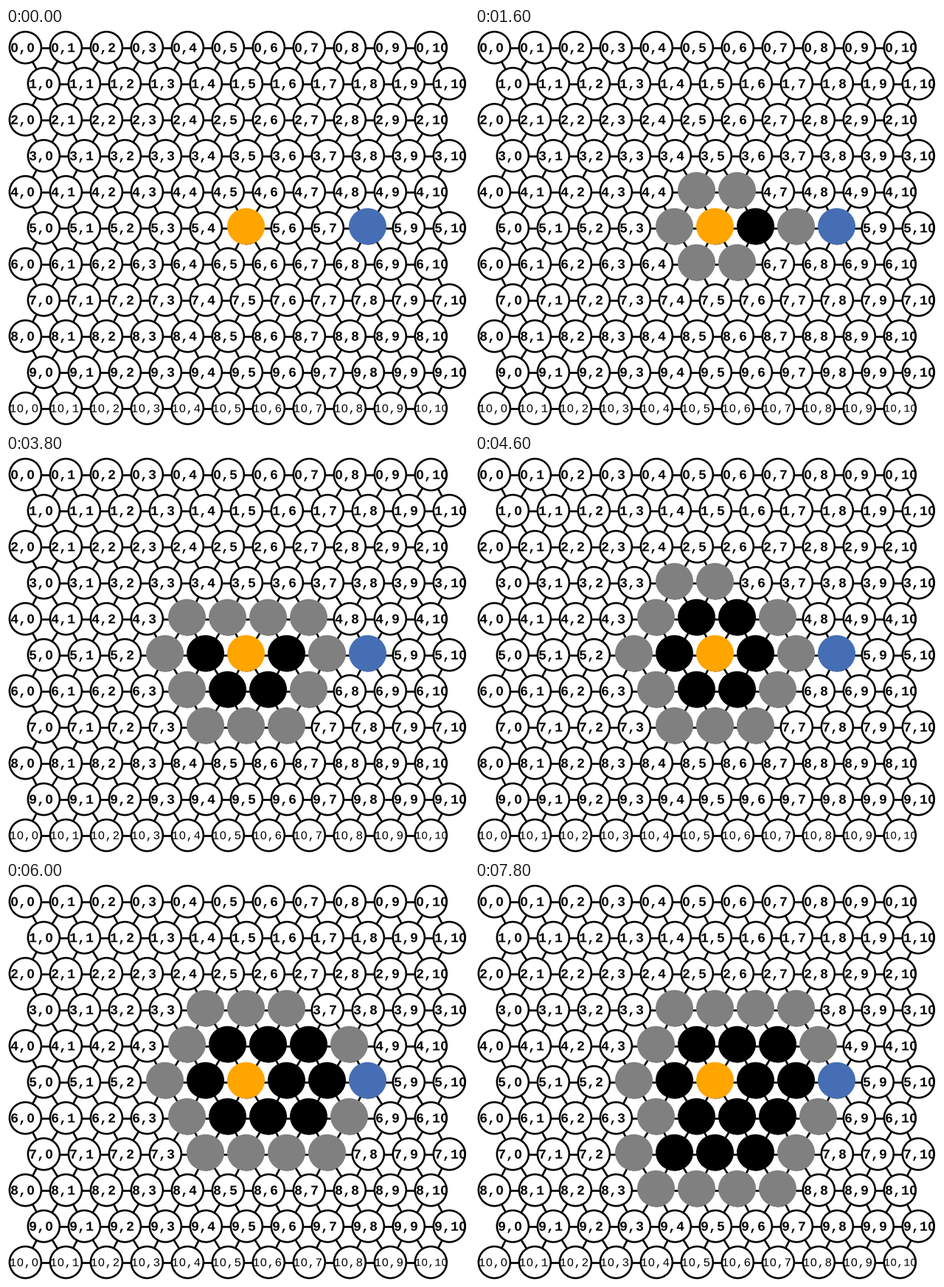
These frames come from a looping animation (628 px wide and 542 px high, 8000 ms). A matplotlib script:

```python
from collections import deque
from functools import lru_cache

import matplotlib.pyplot as plt
from matplotlib.animation import FuncAnimation
from matplotlib.collections import LineCollection
from matplotlib.patches import Circle, Ellipse, PathPatch
from matplotlib.path import Path
from matplotlib.textpath import TextPath
from matplotlib.transforms import Affine2D

W, H = 628, 542
DPI = 100
PX = 72 / DPI
N = 11
STEPS, STEP_MS = 40, 200
START, GOAL = (5, 5), (5, 8)
START_COLOR, GOAL_COLOR = "#ffa500", "#466eb4"
SEEN, DONE = "#808080", "#000000"


def neighbours(cell):
    """Cells around a hexagonal grid cell, clockwise from the east."""
    r, c = cell
    s = r % 2
    around = [(r, c + 1), (r + 1, c + s), (r + 1, c - 1 + s),
              (r, c - 1), (r - 1, c - 1 + s), (r - 1, c + s)]
    return [(a, b) for a, b in around if 0 <= a < N and 0 <= b < N]


def search():
    """Breadth-first search, one (cell, colour) change per step."""
    seen = {START, GOAL}
    queue = deque([START])
    while queue:
        cell = queue.popleft()
        if cell != START:
            yield cell, DONE
        for near in neighbours(cell):
            if near not in seen:
                seen.add(near)
                queue.append(near)
                yield near, SEEN


def center(cell):
    r, c = cell
    return 26.3 + 55 * c + 25 * (r % 2), H - (26.6 + 49 * r)


@lru_cache(maxsize=None)
def glyph(char, size, weight):
    path = TextPath((0, 0), char, size=size,
                    prop={"family": "Liberation Mono", "weight": weight})
    if char != "0":
        return path
    # plain zero: keep the two outer contours, without the dot
    starts = [i for i, k in enumerate(path.codes) if k == Path.MOVETO]
    ends = starts[1:] + [len(path.codes)]
    parts = [Path(path.vertices[a:b], path.codes[a:b])
             for a, b in zip(starts, ends)]
    parts.sort(key=lambda p: -p.get_extents().height)
    return Path.make_compound_path(*parts[:2])


def draw_label(ax, cell):
    text = f"{cell[0]},{cell[1]}"
    if cell[0] < 10:
        size, advance, weight, left = 18.3, 11, "bold", -20.3
    elif cell[1] < 10:
        size, advance, weight, left = 16, 10, "normal", -21.8
    else:
        size, advance, weight, left = 14.67, 9, "normal", -22
    x, y = center(cell)
    box = glyph("0", size, weight).get_extents()
    base = y - (box.y0 + box.y1) / 2
    chars = [glyph(ch, size, weight).transformed(
                 Affine2D().translate(x + left + i * advance, base))
             for i, ch in enumerate(text)]
    ax.add_patch(PathPatch(Path.make_compound_path(*chars),
                           fc="black", lw=0, zorder=3))


def make_blob(ax, cell, color, visible):
    r, c = cell
    mid = (25.5 + 55 * c + 25 * (r % 2), H - (24.5 + 49 * r))
    blob = Ellipse(mid, 51, 49.6, fc=color, lw=0, zorder=4, visible=visible)
    return ax.add_patch(blob)


fig = plt.figure(figsize=(W / DPI, H / DPI), dpi=DPI, facecolor="white")
ax = fig.add_axes([0, 0, 1, 1])
ax.set_xlim(0, W)
ax.set_ylim(0, H)
ax.axis("off")

cells = [(r, c) for r in range(N) for c in range(N)]
edges = [(center(a), center(b)) for a in cells for b in neighbours(a) if a < b]
ax.add_collection(LineCollection(edges, colors="black", linewidths=2.7 * PX,
                                 zorder=1))
for cell in cells:
    ax.add_patch(Circle(center(cell), 21.5, fc="white", ec="black",
                        lw=2.6 * PX, zorder=2))
    draw_label(ax, cell)

changes = list(search())[:STEPS - 1]
blobs = {cell: make_blob(ax, cell, SEEN, False) for cell, _ in changes}
make_blob(ax, START, START_COLOR, True)
make_blob(ax, GOAL, GOAL_COLOR, True)


def update(step):
    state = dict(changes[:step])
    for cell, blob in blobs.items():
        blob.set_visible(cell in state)
        blob.set_facecolor(state.get(cell, SEEN))
    return list(blobs.values())


anim = FuncAnimation(fig, update, frames=STEPS, interval=STEP_MS,
                     init_func=lambda: update(0), repeat=True, repeat_delay=0)
plt.show()
```
